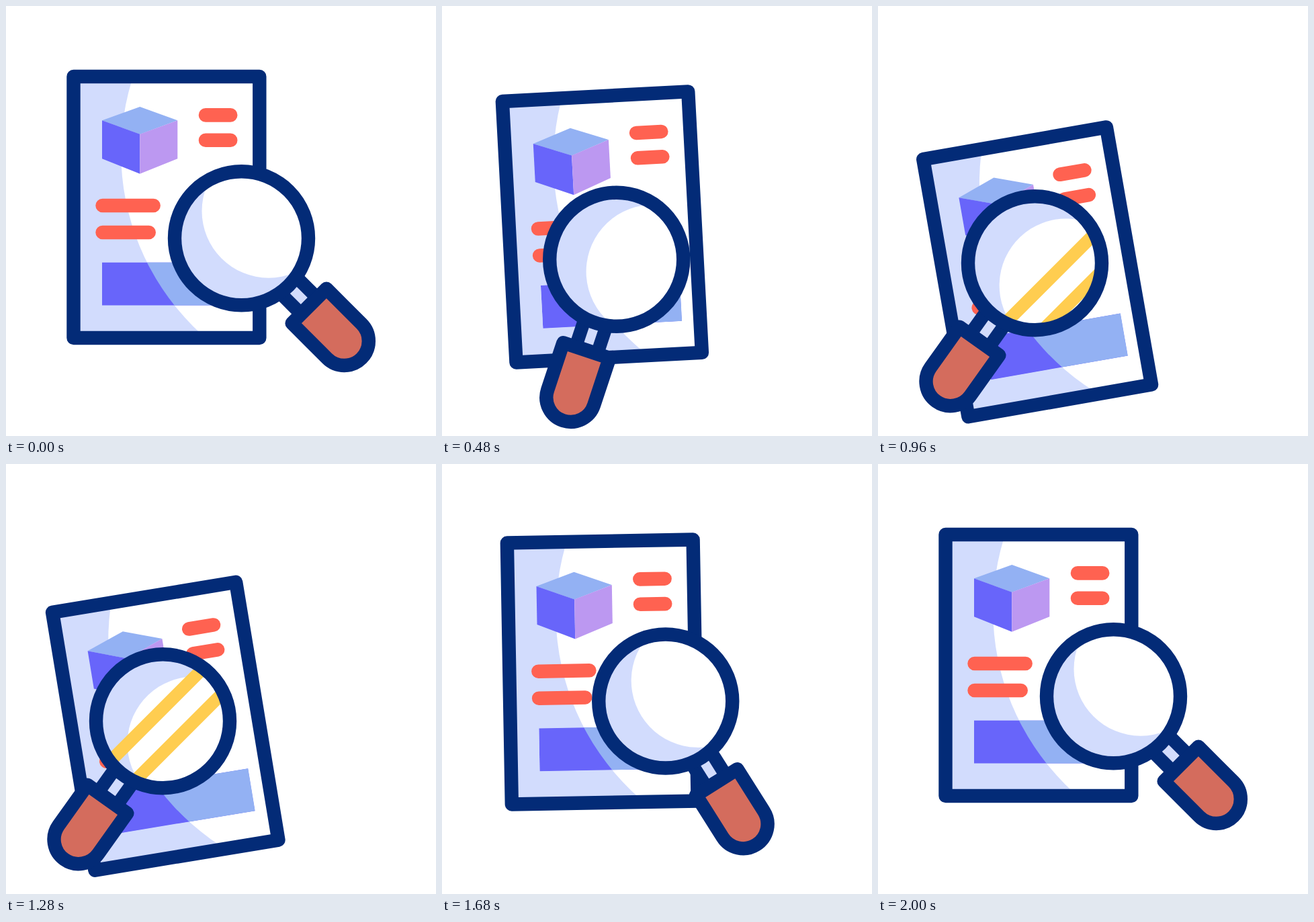
Recreate the animation shown at these times as an HTML page. Size 640 by 640 pixels, loop 2.2 s.

```html
<!DOCTYPE html>
<html lang="en">
<head>
<meta charset="utf-8">
<title>Document search</title>
<style>
  html, body { margin: 0; height: 100%; overflow: hidden; background: #fff; }
  svg { display: block; width: 100vw; height: 100vh; }
  .line { fill: none; stroke: #032b77; stroke-width: 20.4; stroke-linejoin: round; }
  .text { stroke: #ff6251; stroke-width: 20.6; stroke-linecap: round; }
  .navy { fill: #032b77; }
  .pale { fill: #d2dcfd; }
  .blue { fill: #93b1f3; }
  .violet { fill: #6865fa; }
</style>
</head>
<body>
<svg viewBox="0 0 640 640">
  <defs>
    <clipPath id="page"><rect x="100.5" y="105" width="277" height="389"/></clipPath>
    <clipPath id="bar"><rect x="143" y="381.7" width="207" height="63.8"/></clipPath>
    <clipPath id="lens"><circle r="95"/></clipPath>
  </defs>

  <g id="doc">
    <g clip-path="url(#page)">
      <rect class="pale" x="100" y="105" width="278" height="390"/>
      <circle cx="536.7" cy="218" r="365.5" fill="#fff"/>
    </g>
    <g clip-path="url(#bar)">
      <rect class="violet" x="143" y="381" width="207" height="65"/>
      <circle class="blue" cx="536.7" cy="218" r="365.5"/>
    </g>
    <path class="blue" d="M199.3 150 255.3 170.3 199.3 191 143 170.3Z"/>
    <path class="violet" d="M143 170.3 199.3 190.8V249.7L143 227.3Z"/>
    <path fill="#bc98f1" d="M255.3 170.3 199.3 190.8V249.7L255.3 227.3Z"/>
    <path class="text" d="M297 162.4H334.2M297 199.8H334.2M143.6 297H219.6M143.6 337H212.7"/>
    <rect class="line" x="100.5" y="105" width="276.8" height="389"/>
  </g>

  <g id="glass">
    <g id="turn">
      <rect class="navy" x="90" y="-26.8" width="50" height="53.6"/>
      <rect class="pale" x="105" y="-7" width="27" height="14"/>
      <path class="line" style="fill:#d46c5d" d="M142.5 -36.3H216.4A36.3 36.3 0 0 1 216.4 36.3H142.5Z"/>
      <g clip-path="url(#lens)">
        <circle class="pale" r="98"/>
        <circle cy="-57.3" r="99.5" fill="#fff"/>
      </g>
    </g>
    <g clip-path="url(#lens)">
      <path id="shine" d="M-23.3 -300V300M23.3 -300V300" stroke="#ffcd50" stroke-width="18.7"/>
    </g>
    <circle class="line" r="99.5"/>
  </g>
</svg>
<script>
const LOOP = 2200, STEP = 40;
const [doc, glass, turn, shine] = ['doc', 'glass', 'turn', 'shine'].map(id => document.getElementById(id));

// Eased progress from start to end; x1 and x2 are the handles of a curve (x1, 0, x2, 1).
function ease(time, start, end, x1, x2) {
  const u = Math.min(1, Math.max(0, (time - start) / (end - start)));
  if (u === 0 || u === 1) return u;
  let lo = 0, hi = 1;
  for (let i = 0; i < 24; i++) {
    const s = (lo + hi) / 2, r = 1 - s;
    if (3 * s * r * r * x1 + 3 * s * s * r * x2 + s * s * s < u) lo = s; else hi = s;
  }
  return lo * lo * (3 - 2 * lo);
}

function draw(t) {
  const page = ease(t, 200, 1100, .37, .4) - ease(t, 1120, 2000, .45, .2);
  const swing = ease(t, 200, 760, .21, .26) - ease(t, 1320, 2000, .36, .14);
  const gleam = ease(t, 720, 1160, .333, .667) - ease(t, 1200, 1665, .333, .667);
  const bend = Math.sin(Math.PI * swing) ** 2;
  const x = 350.5 - 117 * (swing - .028 * bend);
  const y = 345.7 + 37 * (swing + .172 * bend);

  doc.setAttribute('transform', `translate(${-1.8 * page} ${98.8 * page}) rotate(${-10.2 * page} 239 299.5)`);
  glass.setAttribute('transform', `translate(${x} ${y})`);
  turn.setAttribute('transform', `rotate(${45 + 80.5 * swing})`);
  shine.setAttribute('transform', `rotate(45) translate(${128 * (1 - gleam)} 0)`);
}

function tick() {
  const t = performance.now() % LOOP;
  draw(Math.floor(t / STEP) * STEP);
  requestAnimationFrame(tick);
}
tick();
</script>
</body>
</html>
```
